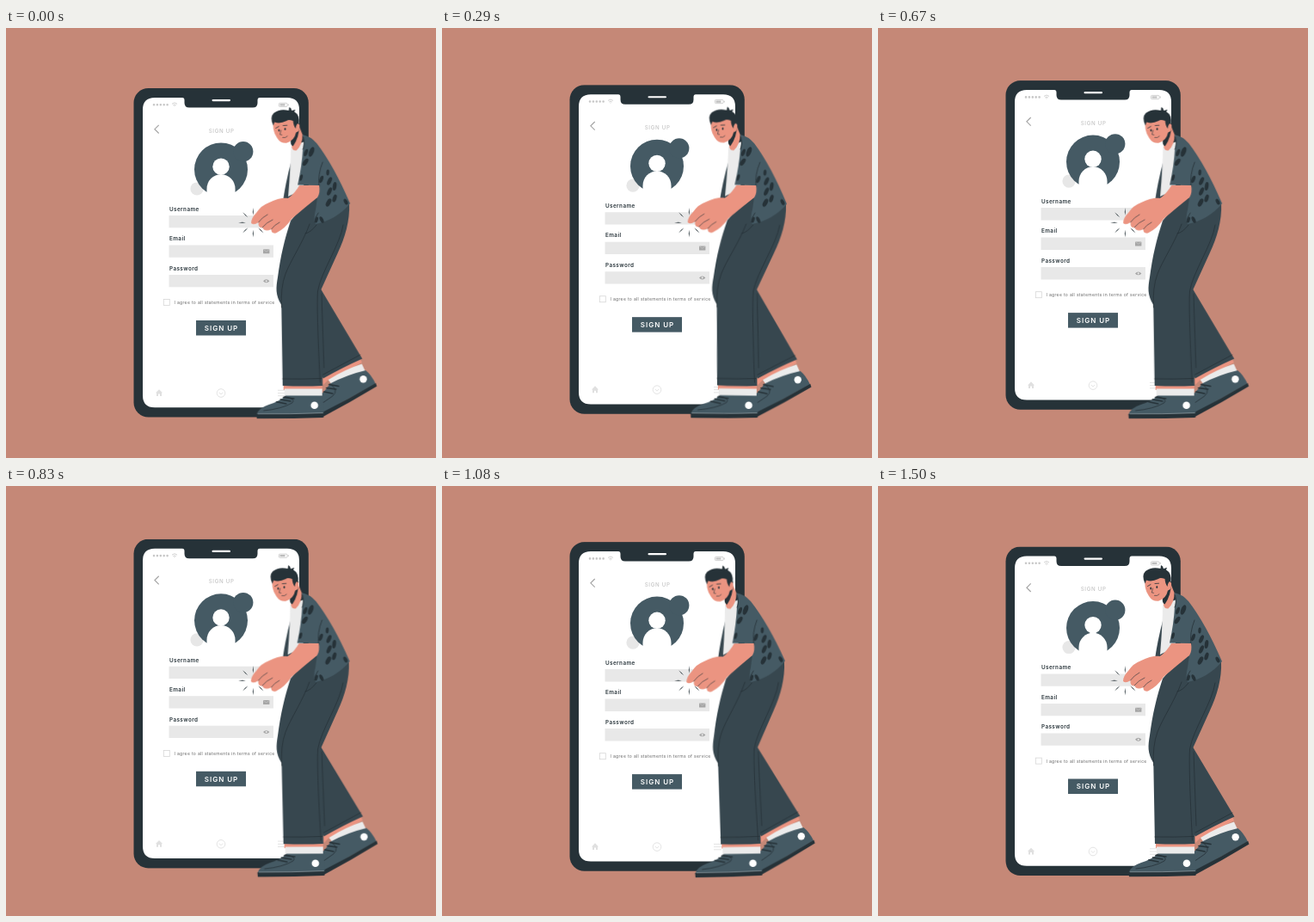
Recreate the animation shown at these times as an HTML page. Size 500 by 500 pixels, loop 1.54 s.

```html
<!DOCTYPE html>
<html lang="en">
<head>
<meta charset="utf-8">
<title>Sign up</title>
<style>
  html, body { margin: 0; width: 100%; height: 100%; overflow: hidden; background: #c58877; }
  svg { display: block; width: 100vw; height: 100vh; }
  text { font-family: Inter, sans-serif; }

  .float, .sway { animation: 1540ms linear -45ms infinite; }
  .float { animation-name: float; }
  .sway { animation-name: sway; transform-origin: 359px 273px; }
  @keyframes float {
    0%, 100% { transform: translateY(.6px); }
    50% { transform: translateY(-9.6px); }
  }
  @keyframes sway {
    0%, 100% { transform: rotate(0deg); }
    25% { transform: rotate(.95deg); }
    75% { transform: rotate(-.95deg); }
  }

  .dark { fill: #263238; }
  .pants { fill: #37474f; }
  .cloth { fill: #455a64; }
  .skin { fill: #eb9481; }
  .white { fill: #fff; }
  .pale { fill: #ebebeb; }
  .line { fill: none; stroke: #263238; stroke-width: .8; stroke-linecap: round; stroke-linejoin: round; }
  .lace { stroke-width: 1.6; }
  .thin { stroke-width: .6; }
  .welt { fill: none; stroke: #b5bdc1; stroke-width: .5; }
  .icon { fill: none; stroke: #e0e0e0; stroke-width: .9; }
  .label { font-size: 6.3px; font-weight: 600; letter-spacing: .43px; fill: #263238; }
  .caps { text-anchor: middle; }
</style>
</head>
<body>
<svg viewBox="0 0 500 500">
  <defs>
    <path id="ray" class="dark" d="M0-17.2 Q.9-12 0-8.5 Q-.9-12 0-17.2Z"/>
  </defs>

  <g class="float">
    <rect class="dark" x="148.5" y="70" width="203.3" height="382.6" rx="17"/>
    <path class="white" d="M173 81 H205 Q207.5 81 207.5 84 V87 Q207.5 92.500 213 92.500 H287 Q292.5 92.500 292.5 87 V84 Q292.5 81 295 81 H327 Q341 81 341 95 V427.300 Q341 441.300 327 441.300 H173 Q159 441.300 159 427.300 V95 Q159 81 173 81Z"/>
    <rect class="white" x="239.5" y="83" width="21.5" height="2.2" rx="1.1"/>

    <path d="M172 89.300 H188" fill="none" stroke="#c7c7c7" stroke-width="2.6" stroke-linecap="round" stroke-dasharray="0 3.9"/>
    <g fill="none" stroke="#c7c7c7" stroke-width=".8">
      <path d="M193 88.300 Q196 85.500 199 88.300 M194.300 89.800 Q196 88.300 197.700 89.800"/>
      <rect x="317.4" y="87.3" width="9.6" height="4.2" rx="1"/>
    </g>
    <path d="M318.5 88.300 H324.500 V90.500 H318.500Z M327.700 88.500 H328.600 V90.300 H327.700Z M195.300 90.500 H196.700 L196 91.600Z" fill="#bdbdbd"/>

    <path d="M177.700 112.900 L172.900 117.700 L177.700 122.500" fill="none" stroke="#a6a6a6" stroke-width="1.2"/>
    <text class="caps" x="250.7" y="121.7" font-size="6.2" font-weight="500" letter-spacing=".7" fill="#c4c4c4">SIGN UP</text>

    <circle cx="222" cy="187" r="7.6" fill="#e7e7e7"/>
    <circle class="cloth" cx="250" cy="164.5" r="31"/>
    <circle class="cloth" cx="275.8" cy="143.700" r="11.6"/>
    <circle class="white" cx="250" cy="161.2" r="9.7"/>
    <path class="white" d="M233.500 197 V187 A16.500 16.800 0 0 1 266.500 187 V197Z"/>

    <path fill="#e8e8e8" d="M189.500 218 H311 V232.300 H189.500Z M189.500 252.500 H311 V266.800 H189.500Z M189.500 287 H311 V301.300 H189.500Z"/>
    <text class="label" x="190" y="212.8">Username</text>
    <text class="label" x="190" y="247.3">Email</text>
    <text class="label" x="190" y="281.8">Password</text>
    <rect x="299" y="257.3" width="7.4" height="5" rx=".5" fill="#a6a6a6"/>
    <path d="M299.300 257.700 L302.700 260 L306.100 257.700" fill="none" stroke="#d5d5d5" stroke-width=".5"/>
    <path d="M299 294.300 Q302.700 290.400 306.400 294.300 Q302.700 298.200 299 294.300Z" fill="#a6a6a6"/>
    <circle cx="302.7" cy="294.3" r="1.1" fill="#e8e8e8"/>

    <rect x="183.3" y="315.6" width="7" height="7" fill="#fff" stroke="#d6d6d6" stroke-width=".8"/>
    <text x="195.5" y="321.3" font-size="5" letter-spacing=".34" fill="#666">I agree to all statements in terms of service</text>

    <rect class="cloth" x="221" y="340" width="58" height="17.5"/>
    <text class="caps white" x="250.5" y="351.8" font-size="8" font-weight="600" letter-spacing="1">SIGN UP</text>

    <path d="M174 424.300 L178 420.200 L182 424.300 H181 V428 H179 V425.500 H177 V428 H175 V424.300Z" fill="#e0e0e0"/>
    <circle class="icon" cx="250" cy="424.5" r="4.8"/>
    <path class="icon" d="M247.800 423.800 L250 426 L252.200 423.800 M316 421.300 H325 M316 424.500 H325 M316 427.700 H325"/>
  </g>

  <g transform="translate(287.3 226.3)">
    <use href="#ray"/>
    <use href="#ray" transform="rotate(45)"/>
    <use href="#ray" transform="rotate(135)"/>
    <use href="#ray" transform="rotate(180)"/>
    <use href="#ray" transform="rotate(225)"/>
    <use href="#ray" transform="rotate(270)"/>
    <use href="#ray" transform="rotate(315)"/>
  </g>

  <g class="sway">
    <!-- back leg -->
    <path class="skin" d="M369 405 L412 384 L414 389 L375 409 L368 416Z"/>
    <path class="pale" d="M375 409 Q394 397 414 390.500 L418 399 L380 416Z"/>
    <path class="cloth" d="M366 427 Q373 420 377 413.500 Q397 403 418.500 398 Q425 403 430 413.500 L367 449Z"/>
    <path class="dark" d="M367 447.500 Q400 431 430.300 412.800 L431.500 416.500 Q401 435 369 452Z"/>
    <path class="line lace" d="M376 414.500 L387 416.500 M373 418.500 L384 420 M370 423 L380 425"/>
    <path class="line" d="M377 414 Q388 421 380 428 L367 437"/>
    <circle class="white" cx="415.7" cy="408.3" r="4.2"/>
    <path class="pants" d="M355 290 L367 305 L414.500 384.500 Q393 394 369 407.500 L360 390Z"/>
    <path class="line" d="M412 380 L369 403 M367 309 L370 395"/>

    <!-- front foot -->
    <path class="skin" d="M323 414 H368 V421 H323Z"/>
    <path class="pale" d="M324 419.500 H368 V429 H324Z"/>
    <path class="cloth" d="M291.700 449.500 Q294 442 306 438 Q319 434 325.500 427.500 H368 Q370 437 369.500 449Z"/>
    <path class="dark" d="M291.600 449 Q330 449.500 369.700 447.800 L369.500 453 Q330 454.500 292 454.300Z"/>
    <path class="welt" d="M293 448.800 Q330 449.200 369 447.600"/>
    <path class="line lace" d="M323 429.500 L335 431 M319.500 432 L331 434 M315 434.700 L326 437"/>
    <path class="line" d="M324 428.500 Q338 431 333 436 Q321 443 300 445"/>
    <circle class="white" cx="359" cy="438.7" r="4.3"/>

    <!-- trousers -->
    <path class="pants" d="M331 224 L355 196 L399 204 C400 224 394 244 386 261 L366.500 304 Q366 330 368.500 416 Q345 417 322 416 L320.300 322 C313 310 314 302 316 290 C319 266 324 245 331 224Z"/>
    <path class="line" d="M353 228 C345 250 331 270 325 286 Q319 302 320.500 325 M392 229 C389 251 366 284 362.500 306 Q361 326 365.500 412 M322 408 Q345 408.500 367 407.500 M361 229 Q354 238 348 239"/>

    <!-- torso -->
    <path class="pants" d="M331 157 Q325 180 322 201 L334 195Z"/>
    <path class="pale" d="M331 138 L347 132 L346 186 L334 193 L328 196 Q331 160 331 138Z"/>
    <path class="cloth" d="M344.500 124 Q354 126 361 134 Q381 160 400 204 Q384 223 360 228 Q357 222 360 211 L364 183 L339 182.500 Q344 160 345 140 Q347 132 344.500 124Z"/>
    <path class="line" d="M364 184 Q362 171 368 156 M345.500 127 Q348 136 345 141 M359 226 Q359 220 363 215"/>
    <g class="dark">
      <ellipse rx="2.7" ry="6" transform="translate(355 144) rotate(22)"/>
      <ellipse rx="2" ry="4.4" transform="translate(348.500 145) rotate(20)"/>
      <ellipse rx="2.4" ry="4.8" transform="translate(348 156) rotate(35)"/>
      <ellipse rx="1.7" ry="3.8" transform="translate(343 174) rotate(15)"/>
      <ellipse rx="2" ry="4.5" transform="translate(366.500 176) rotate(20)"/>
      <ellipse rx="1.7" ry="3.4" transform="translate(374 168) rotate(5)"/>
      <ellipse rx="2.2" ry="5" transform="translate(376 178) rotate(25)"/>
      <ellipse rx="2.2" ry="5" transform="translate(382 184) rotate(8)"/>
      <ellipse rx="2.2" ry="5" transform="translate(376 190) rotate(25)"/>
      <ellipse rx="2.2" ry="4.6" transform="translate(382 198) rotate(18)"/>
      <ellipse rx="2.5" ry="5" transform="translate(375 203) rotate(28)"/>
      <ellipse rx="2" ry="3.7" transform="translate(395 202) rotate(-28)"/>
      <ellipse rx="2" ry="4" transform="translate(367 223) rotate(-25)"/>
      <ellipse rx="1.7" ry="3.5" transform="translate(361 223) rotate(15)"/>
    </g>

    <!-- arm and hand -->
    <path class="skin" d="M341 183 H364 Q365.500 192 362 197 Q347 209 332 222 Q325 233 314 238.500 Q308 239.500 308.500 234 Q301 238 298 232 Q293 233 293.500 226 Q288 230 285 227 Q285 221 291 215 Q297 206 306 203 Q318 197 328 198 Q336 192 341 183Z"/>
    <path class="line thin" d="M293.500 226 Q298 220 304 217 M298 232 Q303 226 310 223 M308.500 234 Q312 229 318 226"/>

    <!-- head -->
    <path class="skin" d="M331 128 L340 113 L344.500 124 Q345 135 337.500 142.500 Q332 143 332 137Z"/>
    <path class="dark" d="M335 110 L341 111 Q341 127 333.500 137.500 Q330 136 331 130Z"/>
    <path class="skin" d="M311 107 Q308.500 119 315 128 Q319 134.500 326 133.800 Q335 131 337 121.500 Q342 120.500 341 113 Q338 107 330 101Z"/>
    <path class="dark" d="M310.500 113.500 Q306 104 311 99 Q318 93.500 328.500 96 L329 92 Q331.500 93 332 96.200 L336 94.800 L335 97.500 Q341.500 101 340.500 111.500 Q337.500 110 336.500 117 Q334 114 333.500 108 Q328 106 326 108 Q318 112 312 109.500Z"/>
    <ellipse class="dark" cx="317.2" cy="119" rx=".9" ry="1.5"/>
    <ellipse class="dark" cx="324.3" cy="117.5" rx=".9" ry="1.5"/>
    <path class="line" d="M313.500 116.500 L317 114.500 M322 113.500 L326.500 113.200"/>
    <path class="line thin" d="M319.500 119 L318.300 124 L320.500 124.300 M321.500 127.500 Q325 128.300 327 125.800"/>
  </g>
</svg>
</body>
</html>
```
